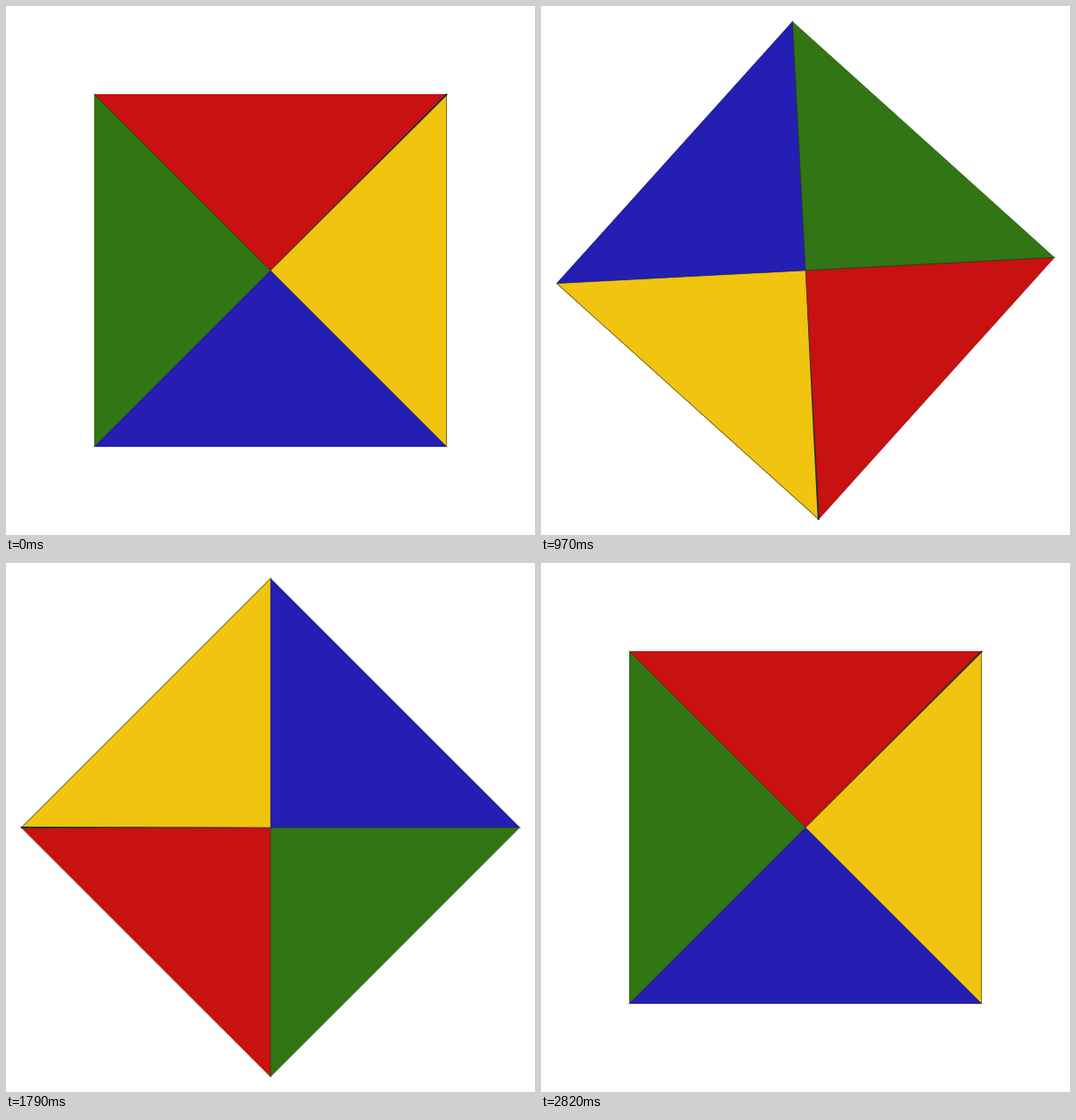
An HTML page that plays this animation: 600x600 px, repeating every 3.15 s.

```html
<!DOCTYPE html>
<html lang="en">
<head>
<meta charset="utf-8">
<title>Turning square</title>
<style>
  html, body { margin: 0; width: 100%; height: 100%; overflow: hidden; background: #fff; }
  svg { display: block; width: 100%; height: 100%; }
</style>
</head>
<body>
<svg viewBox="-300 -300 600 600">
  <g id="square">
    <path fill="#2b2b22" d="M-200-200H200V200H-200Z"/>
    <path fill="#c81111" d="M0 0L-200-200H200Z"/>
    <path fill="#f0c40f" d="M0 0L200-200V200Z"/>
    <path fill="#241eb3" d="M0 0L200 200H-200Z"/>
    <path fill="#317514" d="M0 0L-200 200V-200Z"/>
    <g fill="none" stroke="#22301c" stroke-width=".8">
      <path stroke-opacity=".7" d="M0 0L-200.7-200.7M0 0L-200.7 200.7"/>
      <path stroke-opacity=".4" d="M0 0L200.7 200.7"/>
      <path stroke-opacity=".75" d="M199.6-200V200"/>
    </g>
    <!-- seam that widens towards the corner -->
    <path fill="#22301c" d="M-.2-.2L199.6-201L201-199.6L.2.2Z"/>
  </g>
</svg>
<script>
  const LOOP = 3150, TICK = 30;
  // start time and number of steps of each quarter turn
  const turns = [[30, 14], [790, 15], [1580, 16], [2400, 15]];
  const square = document.getElementById('square');

  function angleAt(time) {
    return turns.reduce((angle, [start, steps]) => {
      const done = Math.floor((time - start) / TICK) + 1;
      return angle + 90 * Math.min(Math.max(done / steps, 0), 1);
    }, 0);
  }

  function draw() {
    square.setAttribute('transform', `rotate(${angleAt(performance.now() % LOOP)})`);
    requestAnimationFrame(draw);
  }
  draw();
</script>
</body>
</html>
```
